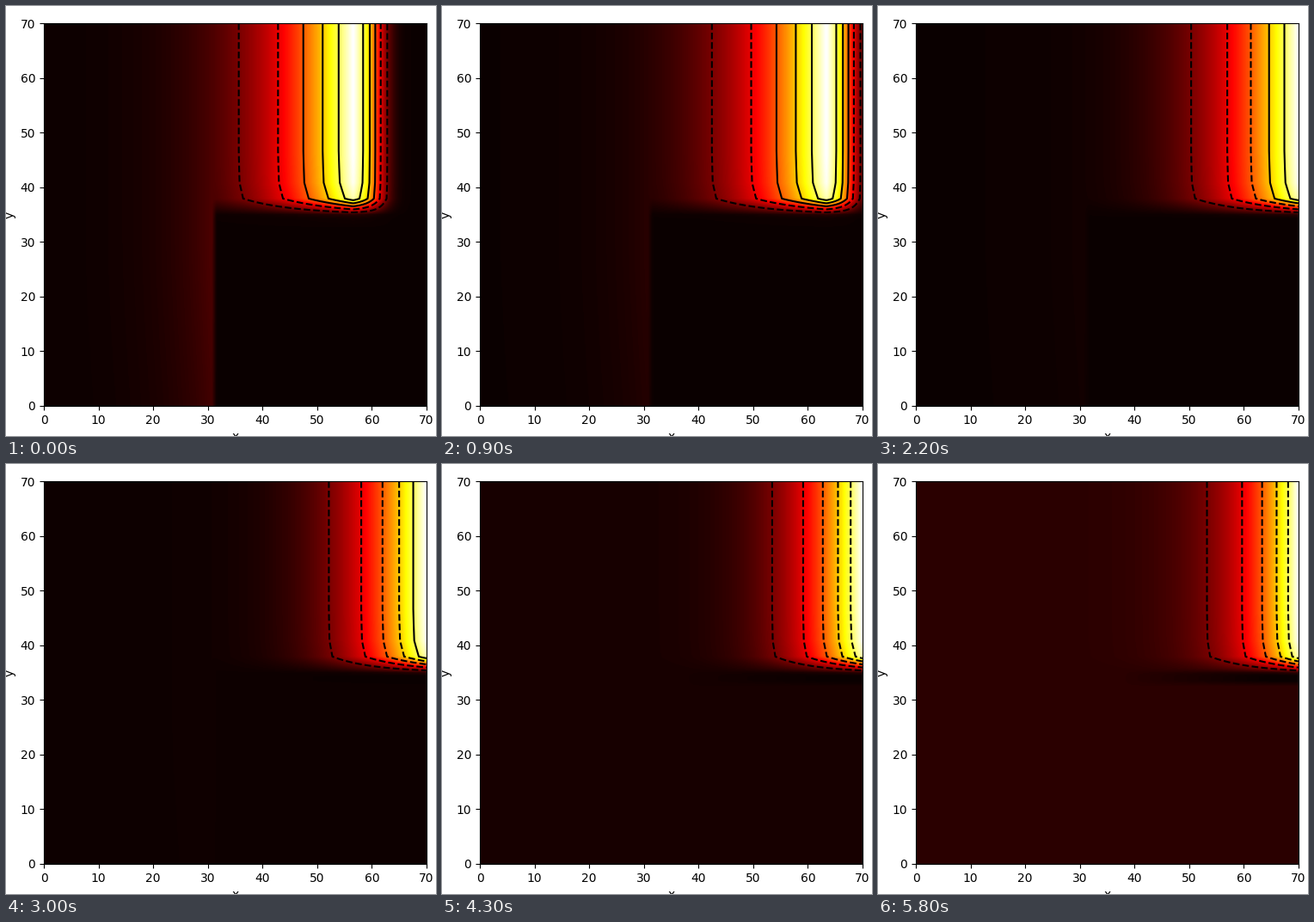
Write a matplotlib script that moves like this. It is 500 px wide and 500 px high and loops after 5900 ms.

```python
import numpy as np
import matplotlib.pyplot as plt
from matplotlib.animation import FuncAnimation

FRAMES, SIZE = 59, 70
START, SPEED = 56.6, 0.755
EXIT = (SIZE - START) / SPEED  # when the crest reaches the right edge
LEVELS = np.arange(1, 6) / 6

xs = np.linspace(0, SIZE, 281)
X, Y = np.meshgrid(xs, xs)
XC, YC = np.meshgrid(xs, np.linspace(0, SIZE, 25))  # coarse rows for contours


def since_exit(t):
    return max(t - EXIT, 0)


def rest(t):
    """Resting level, which rises as the range of values shrinks."""
    return 0.003 + 0.044 * (since_exit(t) / 40) ** 2.1


def pulse(x, t):
    """Steep front and long tail on both sides of the crest."""
    u, b = since_exit(t), rest(t)
    gap = x - min(START + SPEED * t, SIZE)
    d = np.abs(gap)
    soft = d * d / (d + 0.15)
    slope = 0.070 + 0.00035 * u + 0.000014 * u * u
    bend = 0.0008 + 0.0009 * np.sin(np.pi * u / 45)
    tail = slope * soft + bend * d ** 2
    front = 0.092 * soft + 0.0052 * d ** 3
    return b + (1 - b) * np.exp(-np.where(gap < 0, tail, front))


def field(t, x, y):
    b, early = rest(t), np.clip(1 - t / 30, 0, 1)
    lean = 1.5 * np.clip(1 - y / 30, 0, 1) ** 1.5
    p = pulse(x - lean, t)

    # Right of the step the pulse only travels in the upper half.
    lift = np.interp(y, [32.5, 34.4, 35, 37.9, 40.8, 46],
                     [0, 0.012 * early, 0.045, 0.92, 0.985, 1])
    dip = np.clip(1.6 - np.abs(y - 34.1), 0, 1) * np.clip((x - 38) / 27, 0, 1)
    low = b * (1 - dip * (1 - early))
    step = np.clip((x - 30.7) / 0.9, 0, 1)
    return p * (1 - step) + (low + (p - b) * lift) * step


fig = plt.figure(figsize=(5, 5), dpi=100)
ax = fig.add_axes([0.088, 0.07, 0.89, 0.89])
half = xs[1] / 2
img = ax.imshow(np.zeros_like(X), cmap="hot", vmin=0, vmax=1, origin="lower",
                extent=[-half, SIZE + half] * 2, interpolation="bilinear")
ax.set(xlim=(0, SIZE), ylim=(0, SIZE), xlabel="x", ylabel="y")
ax.set_xticks(range(0, SIZE + 1, 10))
ax.set_yticks(range(0, SIZE + 1, 10))


def draw(t):
    for old in list(ax.collections):
        old.remove()
    img.set_data(field(t, X, Y))
    # Negative levels are dashed; zero climbs as the pulse leaves.
    zero = 0.49 + 0.024 * since_exit(t)
    styles = ["dashed" if v < zero else "solid" for v in LEVELS]
    ax.contour(XC, YC, field(t, XC, YC), LEVELS, colors="k", linestyles=styles)
    return [img]


anim = FuncAnimation(fig, draw, frames=FRAMES, init_func=lambda: draw(0),
                     interval=100, repeat=True, repeat_delay=0)
plt.show()
```
